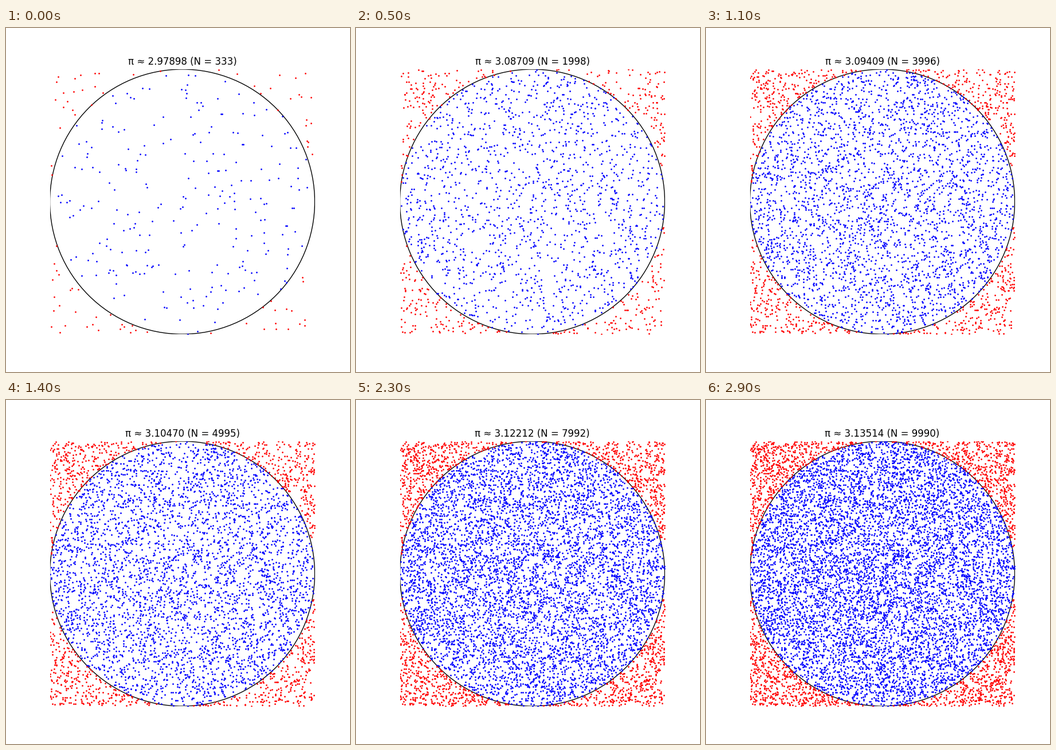
These frames come from a looping animation (600 by 600 pixels, 3 s). A matplotlib script:

```python
import numpy as np
import matplotlib.pyplot as plt
from matplotlib.animation import FuncAnimation

FRAMES = 30
TOTAL = 10000
STEP = TOTAL // FRAMES

np.random.seed(42)
x = np.random.uniform(-1, 1, TOTAL)
y = np.random.uniform(-1, 1, TOTAL)
points = np.column_stack((x, y))
inside = x**2 + y**2 <= 1

fig, ax = plt.subplots(figsize=(6, 6), dpi=100)
ax.set_xlim(-1, 1)
ax.set_ylim(-1, 1)
ax.set_aspect("equal")
ax.axis("off")
ax.add_patch(plt.Circle((0, 0), 1, fill=False, color="black"))
hits = ax.scatter([], [], s=1, color="blue")
misses = ax.scatter([], [], s=1, color="red")
title = ax.set_title("")


def update(frame):
    n = (frame + 1) * STEP
    shown, hit = points[:n], inside[:n]
    hits.set_offsets(shown[hit])
    misses.set_offsets(shown[~hit])
    title.set_text(f"π ≈ {4 * hit.sum() / n:.5f} (N = {n})")
    return hits, misses, title


anim = FuncAnimation(fig, update, frames=FRAMES, interval=100, repeat=True)
plt.show()
```
